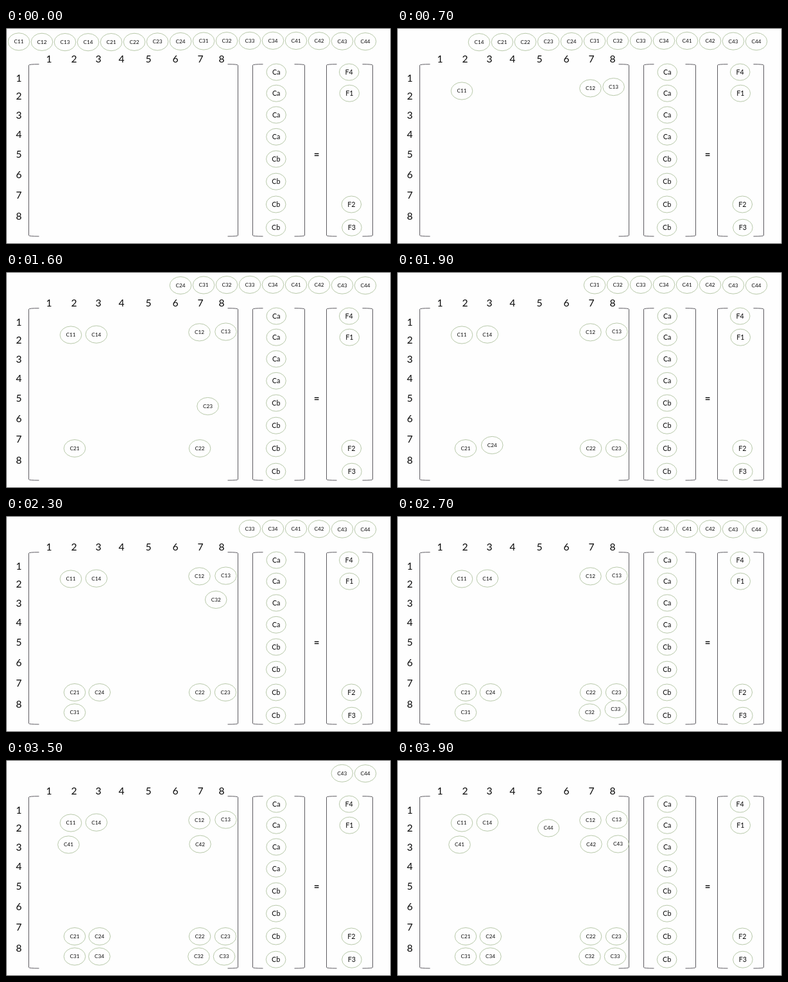
An HTML page for the animation above (4 s loop, 600 px wide and 338 px high).

```html
<!DOCTYPE html>
<html lang="en">
<head>
<meta charset="utf-8">
<title>Matrix assembly</title>
<style>
  html, body { margin: 0; width: 100%; height: 100%; overflow: hidden; background: #fefefe; }
  svg { display: block; width: 600px; height: 338px; }
  text { font-family: Lato, "Open Sans", sans-serif; text-anchor: middle; fill: #0a0a0a; }
  ellipse { fill: #fefefe; stroke: #aabf9a; stroke-width: .85; }
  path { fill: none; stroke: #5c5a60; }
</style>
</head>
<body>
<svg id="stage" viewBox="0 0 600 338">
  <rect x=".5" y=".5" width="599" height="337" fill="#fefefe" stroke="#555"/>
</svg>
<script>
const stage = document.getElementById('stage');
const LOOP = 4000, STEP = 100;
const clamp = (v, low, high) => Math.min(high, Math.max(low, v));
const mix = (a, b, k) => a + (b - a) * k;

function add(parent, tag, attrs, content = '') {
  const node = document.createElementNS('http://www.w3.org/2000/svg', tag);
  for (const key in attrs) node.setAttribute(key, attrs[key]);
  node.textContent = content;
  return parent.appendChild(node);
}

function label(parent, content, x, y, size, weight = 400) {
  add(parent, 'text', { x, y: y + size * .36, 'font-size': size, 'font-weight': weight }, content);
}

// A negative arm makes a closing bracket.
function bracket(x, arm) {
  const top = 56.7, bottom = 326;
  add(stage, 'path', {
    d: `M${x + arm} ${top}Q${x} ${top} ${x} ${top + 1.5}V${bottom - 1.5}Q${x} ${bottom} ${x + arm} ${bottom}`
  });
}

function place(node, x, y) {
  node.setAttribute('transform', `translate(${x} ${y})`);
}

function bubble(content, x, y, rx, ry, size) {
  const group = add(stage, 'g', {});
  add(group, 'ellipse', { rx, ry });
  label(group, content, 0, 0, size);
  place(group, x, y);
  return group;
}

for (const [left, right] of [[35.5, 361.5], [384.5, 465.5], [499.5, 571.5]]) {
  bracket(left, 16);
  bracket(right, -16);
}
label(stage, '=', 484, 198, 15, 700);

const columns = [67, 106, 144, 180, 222, 264, 303, 336];
const results = { 0: 'F4', 1: 'F1', 6: 'F2', 7: 'F3' };
columns.forEach((x, i) => {
  label(stage, i + 1, x, 48.7, 15.6);
  label(stage, i + 1, 20, 78 + 28.5 * i + .35 * i * i, 15.6);
  const y = 69 + 33 * i + .25 * i * i;
  bubble(i < 4 ? 'Ca' : 'Cb', 421.3 - .1 * i, y, 15.3, 13, 10.7);
  if (results[i]) bubble(results[i], 534.7 + .6 * i, y, 15.3, 13, 10.7);
});

// Each group of four lands on a line between two end points.
const lines = [
  [101, 98.5, 342.5, 93.5], [107, 276, 342, 276],
  [107, 307.5, 340, 307.5], [97.5, 132.5, 344.5, 131.5]
];
const alongLine = [0, .83, 1, .165];

// Moves follow one another; those after the eighth run slower for a while.
const startTime = i => 240 * i + 27 * clamp(i - 8, 0, 5);

const movers = Array.from({ length: 16 }, (_, i) => {
  const row = i >> 2, column = i % 4;
  const [x0, y0, x1, y1] = lines[row];
  const from = { x: 20 + 36 * i, y: 21 + 1.2 * Math.cos((i - 3) * .4) };
  const to = { x: mix(x0, x1, alongLine[column]), y: mix(y0, y1, alongLine[column]) };
  const node = bubble(`C${row + 1}${column + 1}`, from.x, from.y, 16.8, 13.6, 8.2);
  return { node, from, to, start: startTime(i), end: startTime(i + 1) };
});

function draw(now) {
  const time = Math.floor(now % LOOP / STEP) * STEP;
  for (const { node, from, to, start, end } of movers) {
    const p = clamp((time - start) / (end - start), 0, 1);
    const k = p * p * (3 - 2 * p);
    place(node, mix(from.x, to.x, k), mix(from.y, to.y, k));
  }
}

const begin = performance.now();
function tick() {
  draw(performance.now() - begin);
  requestAnimationFrame(tick);
}
tick();
</script>
</body>
</html>
```
